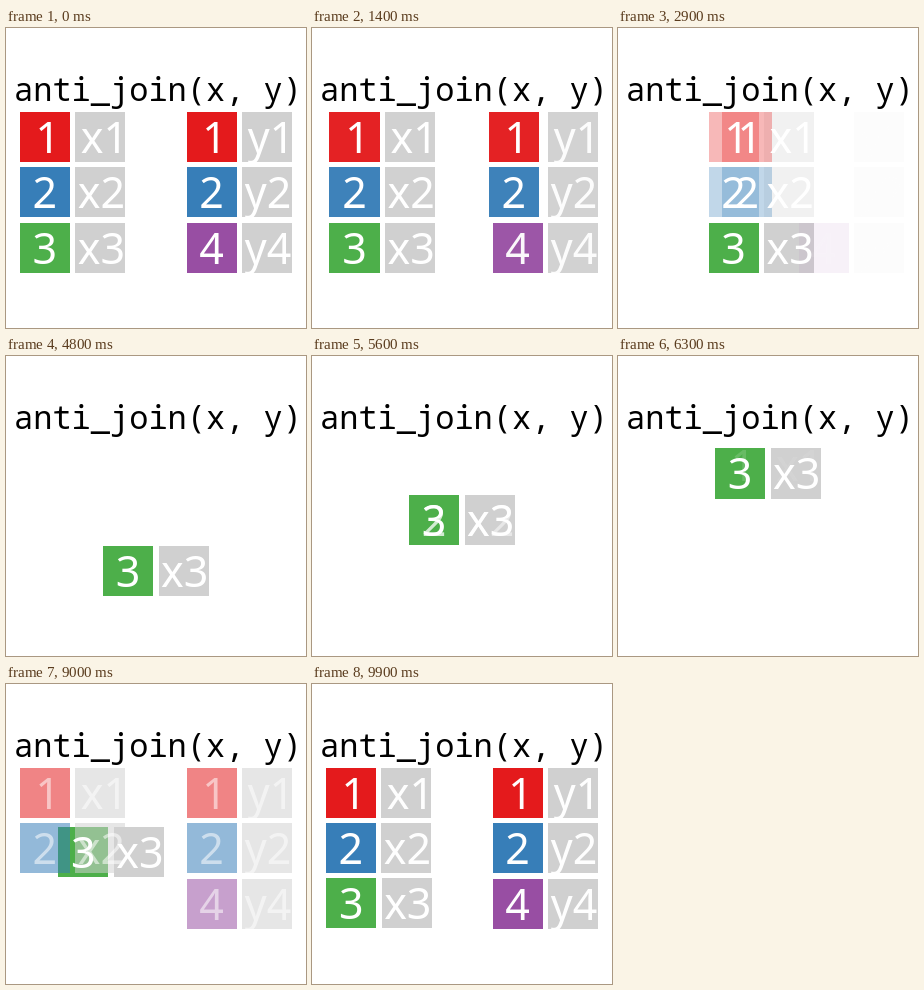
An HTML page that plays this animation: 300 px wide and 300 px high, repeating every 10000 ms.

```html
<!DOCTYPE html>
<html lang="en">
<head>
<meta charset="utf-8">
<title>anti_join(x, y)</title>
<style>
  html, body { margin: 0; width: 100%; height: 100%; overflow: hidden; background: #fff; }
  svg { display: block; width: 100vw; height: 100vh; }
  .title { font: 32px "Noto Sans Mono", "DejaVu Sans Mono", monospace; white-space: pre; }
  .label { font: 43px "Noto Sans", "Open Sans", sans-serif; fill: #fff; text-anchor: middle; }
  rect { shape-rendering: crispEdges; }
</style>
</head>
<body>
<svg viewBox="0 0 300 300">
  <g id="tiles"></g>
  <g id="labels"></g>
  <text class="title" x="8" y="73">anti_join(x, y)</text>
</svg>
<script>
const LOOP = 10000, STEP = 100;
const LEFT = 13.72, TOP = 83.65, PITCH = 55.6, SIZE = 50.04;
const RED = '#e41a1c', BLUE = '#377eb8', GREEN = '#4daf4a', PURPLE = '#984ea3', GREY = '#d0d0d0';

// role: keep = survives the join, match = slides and dissolves, drop = fades in place
// dir: horizontal direction of the slide towards the middle
const cells = [
  ['3', GREEN, 0, 2, 'keep', 1], ['x3', GREY, 1, 2, 'keep', 1],
  ['1', RED, 0, 0, 'match', 1], ['x1', GREY, 1, 0, 'match', 1],
  ['2', BLUE, 0, 1, 'match', 1], ['x2', GREY, 1, 1, 'match', 1],
  ['1', RED, 3, 0, 'match', -1], ['y1', GREY, 4, 0, 'drop', 0],
  ['2', BLUE, 3, 1, 'match', -1], ['y2', GREY, 4, 1, 'drop', 0],
  ['4', PURPLE, 3, 2, 'drop', 0], ['y4', GREY, 4, 2, 'drop', 0]
].map(([label, color, col, row, role, dir]) => {
  const tile = add('tiles', 'rect');
  tile.setAttribute('fill', color);
  const text = add('labels', 'text');
  text.setAttribute('class', 'label');
  text.textContent = label;
  // optical centring
  const nudge = (label.length > 1 ? 1 : 0) + (label.endsWith('1') ? 3 : 0);
  return { tile, text, nudge, col, row, role, dir };
});

function add(parent, tag) {
  const node = document.createElementNS('http://www.w3.org/2000/svg', tag);
  return document.getElementById(parent).appendChild(node);
}

function set(node, attrs) {
  for (const name in attrs) node.setAttribute(name, attrs[name]);
}

// sine in-out between two step numbers
function ease(step, from, to) {
  const t = Math.min(1, Math.max(0, (step - from) / (to - from)));
  return (1 - Math.cos(Math.PI * t)) / 2;
}

const dissolve = p => Math.min(1 - 0.75 * p, 1.1 * Math.sqrt(Math.max(0, 1 - p)));

function pose(cell, step) {
  const merge = ease(step, 11, 33), rise = ease(step, 45, 67), reset = ease(step, 79, 100);
  const { col, row, role, dir } = cell;
  if (role === 'keep') {
    return { col: col + 1.5 * dir * (merge - reset), row: row * (1 - rise + reset), fill: 1, ink: 1 };
  }
  if (step >= 79) return { col, row, fill: reset, ink: reset };
  if (role === 'drop') return { col, row, fill: 1 - merge, ink: 1 - merge };
  return { col: col + 1.5 * dir * merge, row, fill: dissolve(merge), ink: 1 - rise };
}

function draw(step) {
  for (const cell of cells) {
    const { col, row, fill, ink } = pose(cell, step);
    const x = LEFT + col * PITCH, y = TOP + row * PITCH;
    const left = Math.round(x), top = Math.round(y);
    set(cell.tile, {
      x: left, y: top,
      width: Math.round(x + SIZE) - left, height: Math.round(y + SIZE) - top,
      opacity: fill
    });
    set(cell.text, { x: x + SIZE / 2 + cell.nudge, y: y + 41, opacity: ink });
  }
}

const start = performance.now();
function tick() {
  draw(Math.floor((performance.now() - start) % LOOP / STEP));
  requestAnimationFrame(tick);
}
tick();
</script>
</body>
</html>
```
